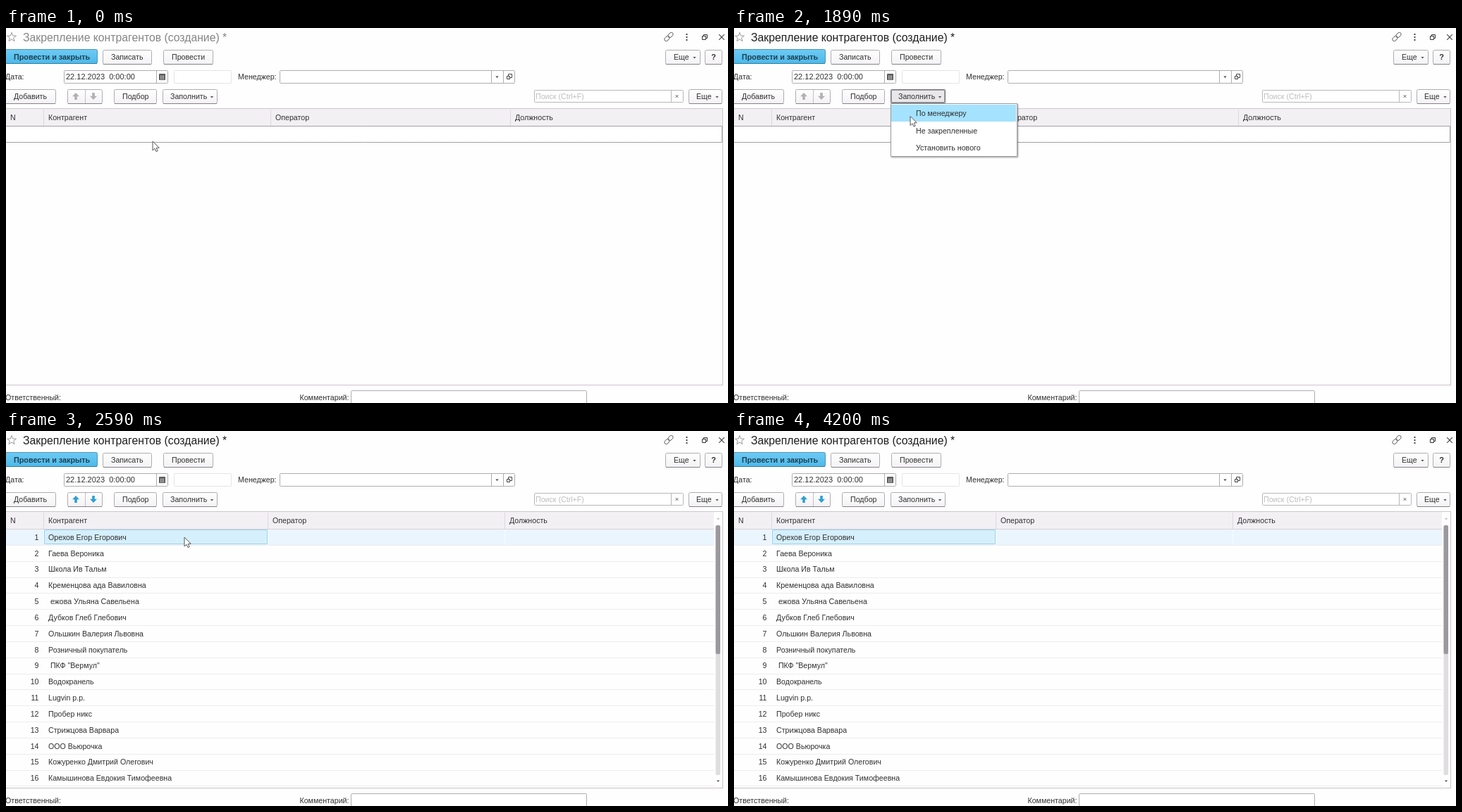
These frames come from a looping animation (1024 px wide and 533 px high, 4.69 s). An HTML page with a canvas:

```html
<!DOCTYPE html>
<html lang="ru">
<head>
<meta charset="utf-8">
<style>
html, body { margin: 0; width: 100%; height: 100%; overflow: hidden; background: #fff; }
canvas { display: block; }
</style>
</head>
<body>
<canvas id="stage" width="1024" height="533"></canvas>
<script>
const ctx = document.getElementById('stage').getContext('2d');
const LOOP = 4690, STEP = 70;
const MENU_OPEN = 1540, MENU_CLOSE = 2380, FILLED = 2520, POINTER_GONE = 4200;
const FONT = '"Liberation Sans", Arial, sans-serif';
const INK = '#303030', EDGE = '#afacb0';

const menuItems = ['По менеджеру', 'Не закрепленные', 'Установить нового'];
const clients = [
  'Орехов Егор Егорович', 'Гаева Вероника', 'Школа Ив Тальм', 'Кременцова ада Вавиловна',
  ' ежова Ульяна Савельена', 'Дубков Глеб Глебович', 'Ольшкин Валерия Львовна',
  'Розничный покупатель', ' ПКФ "Вермул"', 'Водокранель', 'Lugvin p.p.', 'Пробер никс',
  'Стрижцова Варвара', 'ООО Вьюрочка', 'Кожуренко Дмитрий Олегович', 'Камышинова Евдокия Тимофеевна'
];

const smooth = k => k * k * (3 - 2 * k);
const speedUp = k => k ** 1.8;
const pointerStart = [208, 161];
const pointerMoves = [
  { from: 560, to: 910, x: 184, y: 107, ease: smooth },
  { from: 910, to: 1260, x: 247, y: 100, ease: smooth },
  { from: 1680, to: 2100, x: 253, y: 151, ease: smooth },
  { from: 2730, to: 3010, x: 258, y: 160, ease: smooth },
  { from: 3570, to: 4130, x: 470, y: 525, ease: speedUp }
];

function pointerAt(t) {
  let [x, y] = pointerStart;
  for (const move of pointerMoves) {
    const k = move.ease(Math.min(1, Math.max(0, (t - move.from) / (move.to - move.from))));
    x += (move.x - x) * k;
    y += (move.y - y) * k;
  }
  return [x, y];
}

// y is the visual middle of the line
function text(str, x, y, { color = INK, size = 10.65, weight = '', align = 'left' } = {}) {
  ctx.font = `${weight} ${size}px ${FONT}`;
  ctx.fillStyle = color;
  ctx.textAlign = align;
  ctx.fillText(str, x, y + size * 0.36);
}

function fill(x, y, w, h, color) {
  ctx.fillStyle = color;
  ctx.fillRect(x, y, w, h);
}

function box(x, y, w, h, edge, paint, radius = 0) {
  ctx.beginPath();
  ctx.roundRect(x + 0.5, y + 0.5, w - 1, h - 1, radius);
  if (paint) { ctx.fillStyle = paint; ctx.fill(); }
  ctx.strokeStyle = edge;
  ctx.lineWidth = 1;
  ctx.stroke();
}

function shape(points, { paint, edge, width = 1, open } = {}) {
  ctx.beginPath();
  points.forEach(([x, y]) => ctx.lineTo(x, y));
  if (!open) ctx.closePath();
  if (paint) { ctx.fillStyle = paint; ctx.fill(); }
  if (edge) { ctx.strokeStyle = edge; ctx.lineWidth = width; ctx.stroke(); }
}

function gradient(y, h, top, bottom) {
  const g = ctx.createLinearGradient(0, y, 0, y + h);
  g.addColorStop(0, top);
  g.addColorStop(1, bottom);
  return g;
}

function button(x, y, w, label, labelX, style) {
  box(x, y, w, 21, EDGE, gradient(y, 21, '#fff', '#f3f1f4'), 2);
  fill(x + 1, y + 20, w - 2, 1, '#858286');
  if (label) text(label, labelX, y + 10.5, style);
}

function triangle(x, y, size, color, up = 1) {
  shape([[x - size, y - up], [x + size, y - up], [x, y + up * (size - 0.6)]], { paint: color });
}

function cross(x, y, r, color, width) {
  shape([[x - r, y - r], [x + r, y + r]], { edge: color, width, open: true });
  shape([[x + r, y - r], [x - r, y + r]], { edge: color, width, open: true });
}

function arrow(x, y, dir, color) {
  const outline = [[0, -5], [5, 0.3], [1.8, 0.3], [1.8, 5], [-1.8, 5], [-1.8, 0.3], [-5, 0.3]];
  shape(outline.map(([dx, dy]) => [x + dx, y + dy * dir]), { paint: color });
}

function titleBar(active) {
  const star = Array.from({ length: 10 }, (_, i) => {
    const r = i % 2 ? 2.8 : 6.8, a = i * Math.PI / 5;
    return [8 + r * Math.sin(a), 13.2 - r * Math.cos(a)];
  });
  shape(star, { edge: '#9a9a9a' });
  text('Закрепление контрагентов (создание) *', 24, 13.3,
    { size: 15.75, color: active ? '#1e1e1e' : '#858585' });

  ctx.save();
  ctx.translate(940, 12.5);
  ctx.rotate(-Math.PI / 4);
  for (const x of [-7.5, -0.5]) {
    ctx.beginPath();
    ctx.roundRect(x, -2.5, 8, 5, 2.5);
    ctx.strokeStyle = '#777';
    ctx.lineWidth = 1;
    ctx.stroke();
  }
  ctx.restore();
  for (const y of [8, 12, 16]) fill(964.5, y, 2, 2, '#444');
  box(989, 9, 6, 6, '#333');
  box(987, 11, 6, 6, '#333', '#fff');
  cross(1015, 13, 3.8, '#444', 1.1);
}

function commands() {
  box(-6, 30, 136, 21, '#4896bc', gradient(30, 21, '#6fcbf4', '#4bb9ea'), 2);
  fill(0, 50, 129, 1, '#357b9d');
  text('Провести и закрыть', 11, 41, { weight: 'bold', color: '#1f3f50', size: 10.8 });
  button(137, 31, 70, 'Записать', 149);
  button(223, 31, 71, 'Провести', 235);
  button(935, 31, 50, 'Еще', 947);
  triangle(976.5, 42, 2.2, '#555');
  button(991, 31, 25, '?', 1003.5, { weight: 'bold', align: 'center', size: 11 });
}

function fields() {
  text('Дата:', -1, 69.5);
  box(82, 60, 148, 19, EDGE, '#fff', 1);
  fill(213, 61, 1, 17, EDGE);
  text('22.12.2023  0:00:00', 85, 69.5, { size: 11 });
  box(217, 65, 9, 9, '#555', '#666');
  for (const y of [68, 70, 72]) for (const x of [219, 221, 223]) fill(x, y, 1, 1, '#fff');
  box(238, 60, 82, 19, '#e5e3e6', '#fff', 1);

  text('Менеджер:', 329, 69.5);
  box(388, 60, 334, 19, EDGE, '#fff', 1);
  fill(688, 61, 1, 17, EDGE);
  fill(705, 61, 1, 17, EDGE);
  triangle(696.5, 69.5, 2.2, '#444');
  box(712, 65, 6, 6, '#444');
  box(710, 68, 5, 5, '#444', '#fff');
}

function tableTools(menuOpen, filled) {
  button(-6, 87, 77, 'Добавить', 11);
  button(87, 87, 50);
  fill(112, 88, 1, 19, '#c2bfc3');
  const arrowColor = filled ? '#2f9fd2' : '#b1b0b2';
  arrow(99, 97, 1, arrowColor);
  arrow(124, 97, -1, arrowColor);
  button(153, 87, 61, 'Подбор', 165);
  button(222, 87, 78, 'Заполнить', 233);
  if (menuOpen) {
    box(222, 87, 78, 20, '#777478', '#e9e7ea', 1);
    box(223, 88, 76, 18, '#a5a2a6');
    text('Заполнить', 233, 97.5);
  }
  triangle(292, 98, 2.2, '#555');

  box(749, 88, 212, 18, '#b9b6ba', '#fff', 1);
  fill(943, 89, 1, 16, '#b9b6ba');
  text('Поиск (Ctrl+F)', 751, 97.3, { color: '#bdbdbd' });
  cross(951.5, 97, 1.8, '#555', 1);
  button(968, 87, 48, 'Еще', 979);
  triangle(1008.5, 98, 2.2, '#555');
}

function table(filled) {
  const columns = filled ? [53, 371, 707] : [53, 375, 715];
  const right = filled ? 1004 : 1016;
  fill(0, 115, right, 24, '#f3f0f4');
  fill(0, 114, 1017, 1, '#cdc8ce');
  fill(0, 139, right, 1, '#d6d2d7');
  fill(1016, 114, 1, 394, '#cbc5cc');
  fill(0, 507, 1017, 1, '#cbc1cc');
  text('N', 6, 127);
  ['Контрагент', 'Оператор', 'Должность'].forEach((name, i) => {
    fill(columns[i], 116, 1, 23, '#dcd8dd');
    text(name, columns[i] + 7, 127);
  });
  if (!filled) {
    box(-2, 139, 1018, 24, '#a3a0a4', '#fff');
    return;
  }

  fill(0, 140, 1004, 22, '#ebf5fe');
  for (const x of columns) fill(x, 140, 1, 22, '#f7fbff');
  box(54, 140, 317, 21, '#98d3ee', '#d6effc');
  clients.forEach((name, i) => {
    const y = 151 + i * 22.83;
    fill(0, Math.round(y + 11), 1004, 1, '#eeecef');
    text(i + 1, 46.5, y, { align: 'right' });
    text(name, 60, y);
  });
  scrollBar();
}

function scrollBar() {
  for (const [y, h, color] of [[134, 355, '#dfdde0'], [134, 183, '#9b999d']]) {
    ctx.beginPath();
    ctx.roundRect(1006.5, y, 6.5, h, 2);
    ctx.fillStyle = color;
    ctx.fill();
  }
  triangle(1010, 124.5, 2.2, '#bbb', -1);
  triangle(1010, 497.5, 2.2, '#555');
}

function footer() {
  text('Ответственный:', -1, 525.5);
  text('Комментарий:', 416.5, 525.5);
  box(489, 515, 335, 24, EDGE, '#fff', 1);
}

function menu(selected) {
  ctx.save();
  ctx.shadowColor = 'rgba(0,0,0,.4)';
  ctx.shadowBlur = 2;
  ctx.shadowOffsetX = ctx.shadowOffsetY = 1;
  fill(222, 107, 180, 76, '#fff');
  ctx.restore();
  box(222, 107, 180, 76, '#9d9a9e', '#fff');
  fill(223, 109 + selected * 24, 177, 24, '#a4e2fe');
  menuItems.forEach((item, i) => text(item, 258, 121.5 + i * 24.4));
}

function pointer(x, y) {
  const outline = [[0, 0], [0, 13], [3, 10.3], [5, 14.6], [7.2, 13.6], [5.2, 9.5], [9.2, 9.2]];
  shape(outline.map(([dx, dy]) => [x + dx, y + dy]), { paint: '#fff', edge: '#55535a' });
}

function draw(t) {
  const [x, y] = pointerAt(t);
  const menuOpen = t >= MENU_OPEN && t < MENU_CLOSE;
  const filled = t >= FILLED;
  fill(0, 0, 1024, 533, '#fefefe');
  titleBar(t >= MENU_OPEN);
  commands();
  fields();
  tableTools(menuOpen, filled);
  table(filled);
  footer();
  if (menuOpen) menu(y > 133 ? 1 : 0);
  if (t < POINTER_GONE) pointer(x, y);
}

function tick() {
  const t = performance.now() % LOOP;
  draw(Math.floor(t / STEP) * STEP);
  requestAnimationFrame(tick);
}
tick();
</script>
</body>
</html>
```
